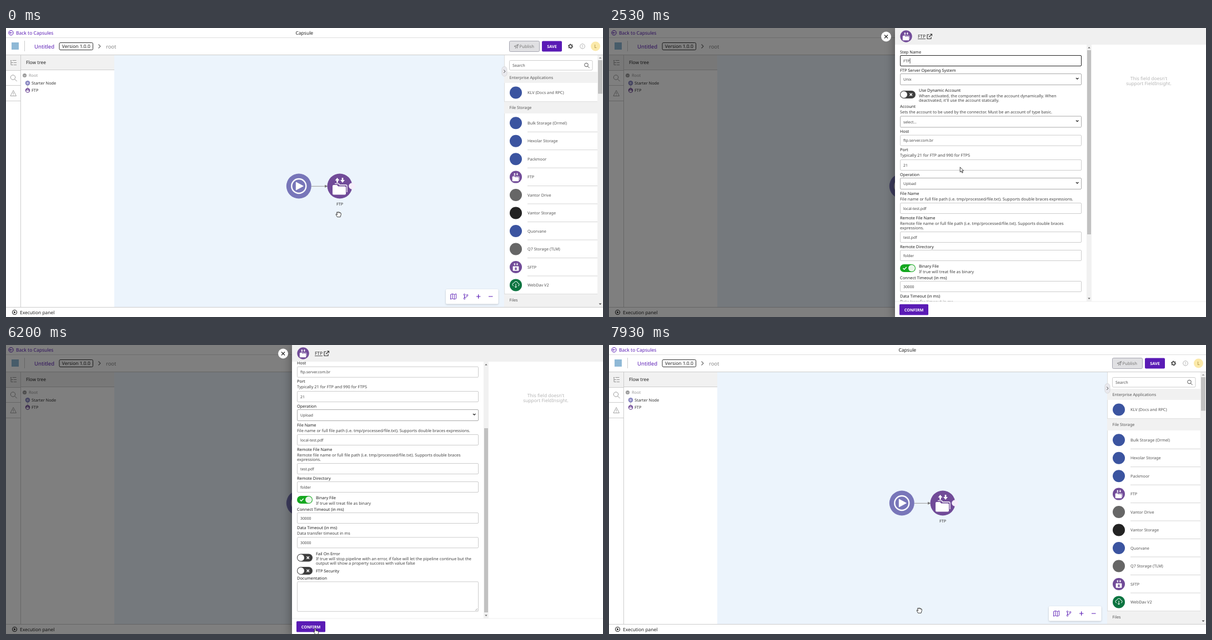
Recreate the animation shown at these times as an HTML page. Size 1075 px wide and 521 px high, loop 8 s.

```html
<!DOCTYPE html>
<html lang="en">
<head>
<meta charset="utf-8">
<title>Flow editor</title>
<style>
html, body { margin: 0; width: 100%; height: 100%; overflow: hidden; background: #fff; }
svg { display: block; font-family: "Noto Sans", "Open Sans", sans-serif; text-rendering: geometricPrecision; }
#panel > .sheet { filter: drop-shadow(0 4px 9px rgba(0,0,0,.4)); }
</style>
</head>
<body>
<svg id="stage" width="1075" height="521" viewBox="0 0 1075 521"></svg>
<script>
const PURPLE = '#5a1bb5', INK = '#333', BLUE = '#3b54a0', FTP = '#714b98';

// Drawing helpers, each returns markup
const text = (x, y, s, size = 7.35, fill = INK, more = '') =>
  `<text x="${x}" y="${y}" font-size="${size}" fill="${fill}" ${more}>${s}</text>`;
const rect = (x, y, w, h, fill, more = '') =>
  `<rect x="${x}" y="${y}" width="${w}" height="${h}" fill="${fill}" ${more}/>`;
const disc = (x, y, r, fill, more = '') =>
  `<circle cx="${x}" cy="${y}" r="${r}" fill="${fill}" ${more}/>`;
const line = (d, stroke, w = 1, more = '') =>
  `<path d="${d}" fill="none" stroke="${stroke}" stroke-width="${w}" ${more}/>`;
const shape = (d, fill, more = '') => `<path d="${d}" fill="${fill}" ${more}/>`;
const group = (x, y, k, body) => `<g transform="translate(${x} ${y}) scale(${k})">${body}</g>`;
const BOLD = ' font-weight="600" ', MID = ' font-weight="500" ', THIN = ' font-weight="300" ';
const CENTER = ' text-anchor="middle" ';

const ftpIcon = (x, y, r, lock) => group(x, y, r / 22.5,
  disc(0, 0, 22.5, FTP) +
  shape('M-4.500-15l4 5h-2.700v4h-2.600v-4h-2.700zM5-6l-4-5h2.700v-4h2.600v4H9z', '#fff') +
  (lock
    ? rect(-11, -3, 22, 17, '#fff', 'rx="2"') + rect(-3.5, 4, 7, 6, FTP) + line('M-2 4v-3h4v3', FTP, 1.5)
    : line('M-9-4.300h7l2 2.300h11q2 0 2 2v11', '#fff', 1.3) +
      shape('M-13 0q0-2 2-2h6l2 2.500H9q2 0 2 2v11q0 2-2 2H-11q-2 0-2-2z', '#fff')));
const playIcon = (x, y, r) => group(x, y, r / 22.5,
  disc(0, 0, 22.5, '#7876b9') + disc(0, 0, 13, 'none', 'stroke="#fff" stroke-width="2.4"') +
  shape('M-5-7L8 0-5 7z', '#fff', 'stroke="#fff" stroke-linejoin="round"'));
const gear = (x, y, r, c) =>
  disc(x, y, r * .72, 'none', `stroke="${c}" stroke-width="${r * .38}"`) +
  disc(x, y, r, 'none', `stroke="${c}" stroke-width="${r * .4}" stroke-dasharray="${r * .5} ${r * .547}"`);
const lens = (x, y, r, c) =>
  disc(x, y, r, 'none', `stroke="${c}"`) + line(`M${x + r * .7} ${y + r * .7}l${r} ${r}`, c);

function header() {
  return rect(0, 0, 1075, 521, '#fff') + line('M0 17.5H1075', '#ddd') +
    disc(9, 8.7, 4.2, 'none', `stroke="${PURPLE}"`) + line('M11.5 8.7h-5m2-2l-2 2 2 2', PURPLE, .9) +
    text(18, 11.5, 'Back to Capsules', 8.5, PURPLE, MID) +
    text(537.3, 11.5, 'Capsule', 8.5, '#222', MID + CENTER) +
    rect(10, 26, 13, 13, '#8fb9d6') + line('M33.5 23v19', '#ccc') +
    text(51, 36.5, 'Untitled', 9.6, PURPLE) +
    rect(96, 26.5, 60.5, 13, '#fff', 'rx="2" stroke="#333"') + text(126.3, 36.2, 'Version 1.0.0', 8.45, '#222', CENTER) +
    line('M166.5 29.5l3.5 3.5-3.5 3.5', '#666', 1.1) + text(180, 36.5, 'root', 9.4, '#888') +
    rect(906.5, 23.5, 54, 19, '#e0e0e3', 'rx="2" stroke="#a5a5b0"') +
    line('M915 33l7.500-3.500-2 7-2-2.500zM918.500 34l4-4.500M917.500 35v2', '#777', .8) +
    text(924.5, 35.8, 'Publish', 7.7, '#777', MID) +
    rect(965, 23.5, 36, 19, PURPLE, 'rx="2"') + text(983, 35.8, 'SAVE', 7.3, '#fff', BOLD + CENTER) +
    gear(1016.5, 33, 3.8, '#444') +
    disc(1038, 33, 4.3, 'none', 'stroke="#aaa" stroke-width=".9"') + text(1038, 35.5, '?', 6.5, '#999', CENTER) +
    disc(1061.5, 33, 8.5, '#fbe9a9') + text(1061.5, 36.2, 'L', 8.5, '#a98c3c', CENTER) +
    line('M0 48.5H1075', '#ccc');
}

function leftSide() {
  return rect(0, 49, 26, 27, '#f1f1f1') + rect(27, 49, 168, 26, '#f1f1f1') +
    line('M26.500 49V503M0 76.500H26M0 103.500H26M0 131.500H26M27 75.500H195', '#ccc') +
    line('M8 58.500h2M11.500 58.500h7M11 62.500h2M14 62.500h5M11 66.500h2M14 66.500h5M9 59v7.500h2M9 62.500h2', '#888', .9) +
    lens(12.5, 89, 4.2, '#999') +
    line('M13.200 112.500l5.300 10h-10.600zM13.200 116v3.500M13.200 120.500v1', '#999', .9) +
    text(36, 65, 'Flow tree', 8.4, '#222') +
    disc(33.5, 85.5, 3.5, '#999') + line('M31.800 85l1.700 1.700 1.700-1.700', '#fff', .8) +
    text(41, 88.2, 'Root', 7.35, '#999') +
    line('M39 99v13', '#aaa', .7) +
    playIcon(39, 99.2, 4.2) + text(46, 101.8, 'Starter Node') +
    ftpIcon(39, 112.5, 4.2) + text(46, 115.3, 'FTP');
}

function canvas() {
  return rect(195, 49, 702, 454, '#ecf4fc') +
    line('M550 285.3h26', '#999', 1) + shape('M574 282.800l5.500 2.500-5.500 2.500z', '#777') +
    playIcon(527.3, 285, 22.5) + ftpIcon(601, 285, 22.5) + disc(623, 285, 5.8, '#f6eefb') +
    text(601, 319.8, 'FTP', 7.2, INK, CENTER) +
    rect(792, 471, 94.5, 26.5, '#fff', 'rx="2" style="filter:drop-shadow(0 1px 1.5px #0003)"') +
    line('M800.500 480.500l3.300-1.300 3.500 1.300 3.300-1.300v8.500l-3.300 1.300-3.500-1.300-3.300 1.300zM803.800 479.500v8M807.300 480.500v8', PURPLE, .9) +
    [[825.5, 480.7], [825.5, 487.7], [830.5, 481.7]].map(([x, y]) =>
      disc(x, y, 1.3, 'none', `stroke="${PURPLE}" stroke-width=".9"`)).join('') +
    line('M825.500 482v4.400M830.500 483q0 2.500-5 2.500', PURPLE, .9) +
    line('M847 484h7.400M850.700 480.300v7.400M869 484h7.500', PURPLE, 1.2);
}

function library() {
  const items = [
    [116.5, 'KLV (Docs and RPC)', BLUE], [171.3, 'Bulk Storage (Ormel)', BLUE],
    [203.7, 'Hexolar Storage', BLUE], [236.2, 'Packmoor', BLUE], [268.6, 'FTP'],
    [301, 'Vantor Drive', '#666'], [333.5, 'Vantor Storage', '#232323'], [366, 'Quorvane', BLUE],
    [398.5, 'Q7 Storage (TLM)', '#666'], [431, 'SFTP'], [463.4, 'WebDav V2', '#0b7440']];
  const bars = [[79, 20, 'Enterprise Applications'], [133, 21, 'File Storage'], [479.5, 23.5, 'Files']];
  return rect(897, 49, 168, 454, '#fff') + line('M897.500 49V503', '#ddd') +
    rect(906.5, 58.5, 149.5, 17.5, '#fff', 'rx="2" stroke="#ccc"') +
    text(912, 70.2, 'Search', 7.2, '#555') + lens(1045, 66.5, 3.3, '#555') +
    bars.map(([y, h, s]) => rect(897, y, 168, h, '#f1f1f1') + text(906.5, y + 13.2, s, 7.25, '#555', THIN)).join('') +
    line('M897 132.700H1065M897 479.500H1065', '#ddd') +
    items.map(([y, s, c], i) =>
      (c ? disc(918, y, 11, c) : ftpIcon(918, y, 11, s == 'SFTP')) +
      text(939, y + 2.7, s, 7.25, '#555', THIN) +
      (i && i < 10 ? line(`M939 ${y + 16}H1065`, '#d5d5d5') : '')).join('') +
    line('M914 465q-2-.5-2-2.500 0-2.500 2.800-2.800 1-3 3.700-2.700 2.700.2 3.200 3 2.500.3 2.300 2.800-.2 2-2 2.200M918 461v7m-2-2l2 2 2-2', '#fff', 1) +
    rect(893, 69.5, 9, 17.5, '#e9e9ee', 'rx="4.5" stroke="#ccc" stroke-width=".6"') +
    line('M896.300 75.500l2.700 2.700-2.700 2.700', '#444') +
    rect(1065, 49, 10, 454, '#f1f1f1') + rect(1066, 58, 8, 60.5, '#c1c1c1') +
    shape('M1067.500 55h5l-2.500-2.500z', '#999') + shape('M1067.500 496.500h5l-2.500 2.500z', '#444');
}

const footer = () => rect(0, 503, 1075, 18, '#fff') + line('M0 503.500H1075', '#ccc') +
  disc(15.5, 512.5, 4, 'none', 'stroke="#222" stroke-width="1.1"') + shape('M14.200 510.300l3.500 2.200-3.500 2.200z', '#222') +
  text(25, 515.7, 'Execution panel', 8.4, '#222');

const nodeTools = () => `<g id="tools">` +
  rect(582.5, 239, 37.5, 18, '#fff', 'rx="3"') + `<g id="hover">${disc(592.3, 248, 6.5, '#dcdcdc')}</g>` +
  gear(592.3, 248, 2.8, '#555') +
  shape('M606.800 244h2l.5-.8h2l.5.8h2v1.200h-7zM607.300 245.800h6v5.400q0 1-1 1h-4q-1 0-1-1z', '#d2232f') +
  line('M609.300 247v3.500M611.300 247v3.500', '#fff', .6) + `</g><g id="tip">` +
  rect(541.3, 214.5, 63.2, 20, '#6f6f6f', 'rx="2"') + shape('M589.500 234.500h5.500l-2.700 2.700z', '#6f6f6f') +
  text(573, 227, 'Configurations', 7.2, '#fff', MID + CENTER) + '</g>';

function form() {
  const label = (y, s, x = 9) => text(x, y, s, 7.38, '#222', MID);
  const hint = (y, s, x = 9) => text(x, y, s, 7.38, '#444');
  const input = (y, s) => rect(9.5, y + .5, 326, 19, '#fff', 'rx="1.5" stroke="#ccc"') + text(15, y + 12.6, s, 6.8, '#444');
  const select = (y, s) => rect(9.5, y + .5, 326, 20, '#fff', 'rx="1.5" stroke="#aaa"') + text(15, y + 13.2, s, 6.8, '#444') +
    line(`M326 ${y + 8}l2.200 2.200 2.200-2.200`, '#222', 1.3);
  const toggle = (y, on) => rect(9, y - 7, 28, 14, on ? '#16a821' : '#3f3f3f', 'rx="7"') +
    (on ? disc(30, y, 6, '#e8f5e8') + line(`M14.500 ${y}l2.200 2.200 4-4.200`, '#fff', 1.5)
        : disc(16, y, 6, '#fff') + line(`M26.500 ${y - 2.2}l4.400 4.400m0-4.400l-4.400 4.400`, '#fff', 1.5));
  return label(46, 'Step Name') + input(49, 'FTP') +
    `<g id="focus">${rect(9.5, 49.5, 326, 19, 'none', 'rx="1.5" stroke="#222"')}<g id="caret">${line('M27 54.500v9.500', '#222', .8)}</g></g>` +
    label(79, 'FTP Server Operating System') + select(82, 'Unix') +
    toggle(120) + label(115.4, 'Use Dynamic Account', 43) +
    hint(125.3, 'When activated, the component will use the account dynamically. When', 43) +
    hint(133.2, "deactivated, it'll use the account statically.", 43) +
    label(144, 'Account') + hint(153.8, 'Sets the account to be used by the connector. Must be an account of type basic.') + select(158.5, 'select...') +
    label(189.2, 'Host') + input(192.7, 'ftp.server.com.br') +
    label(222, 'Port') + hint(232, 'Typically 21 for FTP and 990 for FTPS') + input(237, '21') +
    label(266.5, 'Operation') + select(270, 'Upload') +
    label(300.5, 'File Name') + hint(310.6, 'File name or full file path (i.e. tmp/processed/file.txt). Supports double braces expressions.') + input(315, 'local-test.pdf') +
    label(344.8, 'Remote File Name') + hint(354.7, 'Remote file name or full file path (i.e. tmp/processed/file.txt). Supports double braces') +
    hint(362.5, 'expressions.') + input(367, 'test.pdf') +
    label(397, 'Remote Directory') + input(400, 'folder') +
    toggle(433, true) + label(432, 'Binary File', 43) + hint(442, 'If true will treat file as binary', 43) +
    label(452.8, 'Connect Timeout (in ms)') + input(456, '30000') +
    label(485.8, 'Data Timeout (in ms)') + hint(495.8, 'Data transfer timeout in ms') + input(500.3, '30000') +
    toggle(537.5) + label(532.5, 'Fail On Error', 43) +
    hint(542.3, 'If true will stop pipeline with an error, if false will let the pipeline continue but the', 43) +
    hint(550.3, 'output will show a property success with value false', 43) +
    toggle(561) + label(563.7, 'FTP Security', 43) + label(577, 'Documentation') +
    rect(9.5, 580.8, 326, 53.5, '#fff', 'rx="1.5" stroke="#ccc"') + line('M330 633l4-4M332.500 633l1.500-1.500', '#888', .7);
}

function panel() {
  const note = (id, rows) => `<g id="${id}">` +
    rows.map((s, i) => text(457, 94 + i * 8.8, s, 8.4, '#b5b5b5', CENTER)).join('') + '</g>';
  return '<g id="panel">' + rect(0, 0, 560, 521, '#fff', 'class="sheet"') +
    disc(-16, 15.5, 9, '#fff') + line('M-19 12.500l6 6m0-6l-6 6', '#222', 1.1) + '<g id="content">' +
    rect(0, 0, 560, 30, '#f0f0f0') + ftpIcon(20, 15, 10.7) +
    text(41, 18.3, 'FTP', 8.4, '#333', 'text-decoration="underline"') +
    line('M61.500 12h-3.500v7.500h7v-3.500M63 11h3.500v3.500M66 11.500l-5 5', '#333', 1.1) +
    `<svg y="30" width="345" height="463" viewBox="0 30 345 463"><g id="scroll">${form()}</g></svg>` +
    rect(345, 30, 9, 463, '#f1f1f1') + rect(346, 40, 7, 332, '#c1c1c1', 'id="thumb"') +
    shape('M347.300 36.500h4.400l-2.200-2.500z', '#666') + shape('M347.300 486.500h4.400l-2.200 2.500z', '#666') +
    note('noteA', ['Click on a field to check', 'if it supports', 'FieldInsight']) +
    note('noteB', ["This field doesn't", 'support FieldInsight.']) +
    line('M0 493H560', '#eee') + rect(8, 498, 52, 19.5, PURPLE, 'rx="1.5" id="confirm"') +
    text(34, 510.5, 'CONFIRM', 7.25, '#fff', BOLD + CENTER) + '</g></g>';
}

const OUTLINE = 'stroke="#111" stroke-width=".8" stroke-linejoin="round"';
const cursors = () =>
  `<g id="arrow">${shape('M0 0v9l2.100-1.900 1.500 3.300 1.500-.7-1.500-3.200H6.300z', '#fff', OUTLINE)}</g>` +
  `<g id="grab">${shape('M-2.500 4.700L-4.700.8q-.7-1.500.5-1.500l1.700 1.500-1-4q0-1.300 1.200-1l.8 1.600q0-2.300 1.200-2 1 0 1 2 .3-1.700 1.300-1.300.9.200.7 2 .6-1.200 1.300-.6.5.5.3 2.700L3 4.700z', '#fff', OUTLINE)}</g>` +
  `<g id="hand">${shape('M-.7 6V1q0-1.200 1-1.200T1.300 1v3l4 .9q1 .3.900 1.400L5.500 10.500H.7L-2.300 6.700q-.5-1 .5-1z', '#fff', OUTLINE)}</g>`;

document.getElementById('stage').innerHTML = header() + leftSide() + canvas() + library() + footer() + nodeTools() +
  rect(0, 0, 1075, 521, '#000', 'id="shade"') + panel() + '<g id="pointer">' + cursors() + '</g>';

const el = id => document.getElementById(id);
const show = (id, on) => el(id).setAttribute('visibility', on ? 'inherit' : 'hidden');
const move = (id, x, y) => el(id).setAttribute('transform', `translate(${x} ${y})`);
const part = (t, from, to) => Math.min(1, Math.max(0, (t - from) / (to - from)));
const smooth = p => p * p * (3 - 2 * p);

// Cubic bezier easing with y control points 0 and 1
function ease(p, x1, x2) {
  if (p <= 0 || p >= 1) return p;
  let lo = 0, hi = 1;
  for (let i = 0; i < 24; i++) {
    const u = (lo + hi) / 2, v = 1 - u;
    if (3 * v * v * u * x1 + 3 * v * u * u * x2 + u * u * u < p) lo = u; else hi = u;
  }
  return smooth(lo);
}

// Pointer stops: time, x, y
const stops = [[0, 599, 336], [270, 599, 336], [1070, 595, 251.5], [2330, 595, 251.5], [3130, 831, 247],
  [3200, 831, 247], [3700, 857, 262], [3870, 857, 262], [4640, 858, 368], [4730, 858, 368], [5530, 780, 503],
  [5600, 780, 503], [6180, 556.5, 511], [7440, 556, 511], [7920, 559, 478.500], [8000, 559, 478.500]];

function draw(now) {
  const t = now % 8000;
  const i = stops.findIndex((s, n) => t < stops[n + 1][0]);
  const [a, b] = [stops[i], stops[i + 1]], k = smooth(part(t, a[0], b[0]));
  const x = a[1] + (b[1] - a[1]) * k, y = a[2] + (b[2] - a[2]) * k;

  const entering = part(t, 1826.5, 2051.5), left = 1 - ease(part(t, 7258, 7453), .4, .6);
  const open = Math.min(ease(entering, 0, .2), left);
  const blank = t >= 7250;
  move('panel', 515 + 560 * (1 - open), 0);
  show('panel', open > 0);
  show('content', !blank);
  el('shade').setAttribute('opacity', .5 * Math.min(ease(entering, .4, .2), left));

  const focused = t >= 2060;
  show('focus', focused);
  show('caret', focused && (t - 2060) % 1060 < 530);
  show('noteA', !focused);
  show('noteB', focused);

  const drag = smooth(part(t, 3870, 4640));
  move('scroll', 0, -154 * drag);
  move('thumb', 0, 110 * drag);
  el('thumb').setAttribute('fill', t > 3840 && t < 4700 ? '#8a8a8a' : '#c1c1c1');
  el('confirm').setAttribute('fill', t > 7130 ? '#7a45c6' : PURPLE);

  const onNode = t < 2150 && y < 308;
  show('tools', onNode);
  show('hover', onNode && y < 255);
  show('tip', onNode);
  el('tip').setAttribute('opacity', part(t, 1100, 1310));

  const kind = open > 0 ? (x < 575 && y > 498 && !blank ? 'hand' : 'arrow') : (y > 308 && y < 503 ? 'grab' : 'arrow');
  for (const c of ['arrow', 'grab', 'hand']) show(c, c == kind);
  move('pointer', x, y);
}

function loop(now) {
  draw(now);
  requestAnimationFrame(loop);
}
draw(0);
requestAnimationFrame(loop);
</script>
</body>
</html>
```
